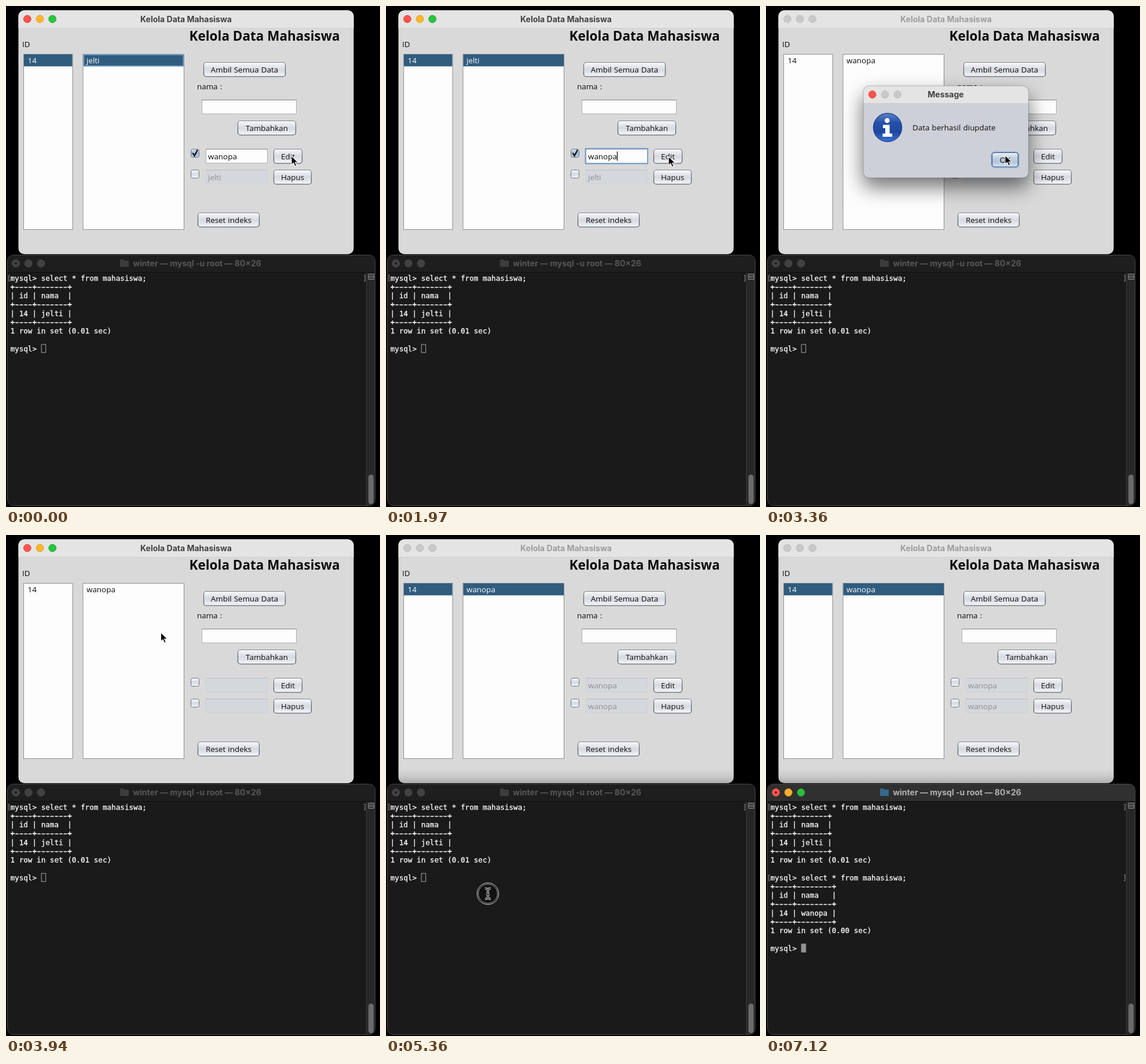
Write an HTML page that moves like this. It is 646 px wide and 866 px high and loops after 7150 ms.

```html
<!DOCTYPE html>
<html lang="id">
<head>
<meta charset="utf-8">
<title>Kelola Data Mahasiswa</title>
<style>
html, body { margin: 0; width: 100%; height: 100%; overflow: hidden; background: #000; }
svg { display: block; width: 646px; height: 866px; }
text { font: 500 13.4px "Open Sans", "Noto Sans", sans-serif; word-spacing: .6px; fill: #0b0b0b; white-space: pre; }
.mid { text-anchor: middle; }
.head { font-size: 22.5px; font-weight: 700; word-spacing: 0; }
.bar { font: 700 14px Inter, Roboto, sans-serif; word-spacing: 0; text-anchor: middle; fill: #9d9c9c; }
.live > .bar { fill: #414040; }
.light { fill: #cac9c9; stroke: #bfbebe; }
.live > .red { fill: #fc554f; stroke: #e2463f; }
.live > .yellow { fill: #fdb62d; stroke: #e0a023; }
.live > .green { fill: #29c53c; stroke: #1fa92f; }
.chrome { fill: #e5e4e4; }
.list { fill: #fdfdfd; stroke: #8b8d92; }
.row { fill: #305c7e; }
.ring { fill: none; stroke: #73a1cd; stroke-width: 2; }
.white { fill: #fff; }
.grey { fill: #8d8e90; }
.btn rect { fill: url(#face); stroke: url(#edge); stroke-width: 1.2; }
.pressed rect { fill: url(#down); stroke: #39587c; }
.default rect { fill: url(#tint); stroke: #2c4468; }
.dlg { filter: drop-shadow(0 16px 17px rgba(0, 0, 0, .55)); }
#term .light { fill: #414142; stroke: #4a4a4b; }
#term .bar { fill: #575758; }
#term .dot { fill: #1d1d1e; }
#term .chrome { fill: #1e1e1f; }
#term .folder { fill: #3c3c3d; }
#term.live .red { fill: #f95951; stroke: #ee504a; }
#term.live .yellow { fill: #f8b02b; stroke: #eda526; }
#term.live .green { fill: #2ac03b; stroke: #25b535; }
#term.live .bar { fill: #b3b3b4; }
#term.live .dot { fill: #7b130f; }
#term.live .chrome { fill: #303031; }
#term.live .folder { fill: #356a8e; }
.mono { font: 12.62px "DejaVu Sans Mono", "Noto Sans Mono", monospace; word-spacing: 0; fill: #fbfbfb; stroke: #fbfbfb; stroke-width: .3; }
.mark { fill: #8c8c8c; stroke: none; }
.dash { stroke: #f0f0f0; stroke-width: 1.1; stroke-dasharray: 6.6 1; }
.block { fill: none; stroke: #929292; stroke-width: 1.2; }
#term.live .block { fill: #929292; }
</style>
</head>
<body>
<svg id="stage" viewBox="0 0 646 866"></svg>
<script>
const LOOP = 7150;
// Key moments in ms
const FOCUS = 700, PRESS = 2220, OPEN = 2330, SAVED = 2510, CLOSE = 3570,
  PICK = 4300, LEAVE = 5290, ENTERED = 5420, RECALL = 6080, RUN = 6700;
const OLD = 'jelti', NEW = 'wanopa';

const rect = (x, y, w, h, rest = '') => `<rect x="${x}" y="${y}" width="${w}" height="${h}" ${rest}/>`;
const text = (x, y, s, cls = '') => `<text x="${x}" y="${y}" class="${cls}">${s.replace('>', '&gt;')}</text>`;
const path = (d, rest) => `<path d="${d}" ${rest}/>`;
const circle = (x, y, r, rest) => `<circle cx="${x}" cy="${y}" r="${r}" ${rest}/>`;
const during = (from, to, inner) => `<g data-on="${from}-${to}">${inner}</g>`;
const grad = (id, ...colors) => `<linearGradient id="${id}" x2="0" y2="1">` +
  colors.map((c, i) => `<stop offset="${i / (colors.length - 1)}" stop-color="${c}"/>`).join('') + '</linearGradient>';

const lights = (x, y) => ['red', 'yellow', 'green']
  .map((c, i) => circle(x + i * 21.7, y, 6.4, `class="light ${c}"`)).join('');

const button = (x, y, w, label, cls = '') =>
  `<g class="btn ${cls}">${rect(x + .5, y + .5, w - 1, 24.5, 'rx="4.5"')}${text(x + w / 2, y + 17.5, label, 'mid')}</g>`;

const field = (x, y, w) => rect(x + .5, y + .5, w - 1, 24, 'fill="#fdfdfd" stroke="#adafb3"') +
  path(`M${x} ${y + .5}h${w}`, 'stroke="#808184"');

const deadField = y => rect(345.5, y + .5, 106, 24, 'fill="#d4d7dc" stroke="#cdd0d6"') +
  path(`M345 ${y + .5}h107`, 'stroke="#b9bcc2"');

const box = (y, fill) => rect(319.5, y + .5, 14, 14, `rx="3" fill="url(#${fill})" stroke="#6c7380"`);

const defs = '<defs>' +
  grad('face', '#fafafc', '#e7e9ed', '#d6dae1', '#e3e6eb', '#f6f7f9') +
  grad('edge', '#7f848e', '#3f4653') +
  grad('down', '#8b94a2', '#9fa7b3', '#a7afbb', '#c2c9d2') +
  grad('tint', '#eef3f8', '#c6d3e0', '#b3c5d6', '#dae7f2') +
  grad('ticked', '#dce8f2', '#9cb9d1', '#b4d0e5') +
  grad('info', '#5f83c9', '#2450ab', '#1f479f', '#3d73d8') +
  grad('shade', '#0000', '#0001', '#0003') + '</defs>';

function lists() {
  const selected = (from, to, name) => during(from, to,
    rect(31, 83.5, 83.5, 20.8, 'class="row"') + rect(133.5, 83.5, 173.5, 20.8, 'class="row"') +
    text(37.5, 99, '14', 'white') + text(139, 99, name, 'white'));
  const ring = rect(134.3, 84.3, 172, 19.3, 'class="ring" style="stroke-width:1.6"');
  return rect(30.5, 83.5, 84.5, 303, 'class="list"') + rect(133, 83.5, 174.5, 303, 'class="list"') +
    selected(0, SAVED, OLD) +
    during(SAVED, PICK, text(37.5, 99, '14') + text(139, 99, NEW)) +
    selected(PICK, LOOP, NEW) +
    during(0, FOCUS, ring) + during(PICK, LEAVE, ring);
}

function editRows() {
  return during(0, SAVED,
      box(247, 'ticked') + path('M322.5 254l3 5 5.5-10.5', 'fill="none" stroke="#111" stroke-width="2.3"') +
      field(345, 247, 107) + text(349, 264.5, NEW)) +
    during(SAVED, LOOP, box(247, 'face') + deadField(247)) +
    box(283, 'face') + deadField(283) +
    during(0, SAVED, text(349, 300.5, OLD, 'grey')) +
    during(PICK, LOOP, text(349, 264.5, NEW, 'grey') + text(349, 300.5, NEW, 'grey')) +
    during(FOCUS, PRESS, rect(344.5, 246.5, 107.5, 26, 'class="ring"') +
      `<g id="caret">${path('M399.5 251.5v16', 'stroke="#000" stroke-width="1.2"')}</g>`);
}

function mainWindow() {
  return `<g data-live="0-${OPEN} ${CLOSE}-${LEAVE}">` +
    rect(21.5, 7.5, 579, 421.5, 'rx="10" fill="#d9d9d9"') +
    path('M21.5 38V17.5a10 10 0 0 1 10-10h559a10 10 0 0 1 10 10V38z', 'class="chrome"') +
    path('M21.5 38.5h579', 'stroke="#cfcece"') +
    lights(36.8, 22.5) + text(311, 27.5, 'Kelola Data Mahasiswa', 'bar') +
    text(316.5, 60, 'Kelola Data Mahasiswa', 'head') + text(28, 71, 'ID') + text(330, 144, 'nama :') +
    lists() + field(338, 162, 164) + editRows() +
    button(341, 97, 142, 'Ambil Semua Data') + button(400, 198, 101, 'Tambahkan') +
    button(462, 247, 50, 'Edit') + button(462, 283, 66, 'Hapus') + button(331, 357, 107, 'Reset indeks') +
    during(PRESS, SAVED, button(462, 247, 50, 'Edit', 'pressed') +
      rect(461.5, 246.5, 51, 26.5, 'rx="5.5" class="ring" style="stroke-width:1.6"')) +
    during(LEAVE, LOOP, path('M21.5 404h579v15a10 10 0 0 1-10 10h-559a10 10 0 0 1-10-10z', 'fill="url(#shade)"')) + '</g>';
}

function terminal() {
  const base = n => 474.5 + n * 15.25;
  const line = (n, s) => text(7.5, base(n), s, 'mono');
  const query = 'mysql> select * from mahasiswa;';
  const brackets = n => text(1.5, base(n), '[', 'mono mark') + text(616, base(n), ']', 'mono mark');
  // Hyphens are lengthened so that a rule reads as one line
  const rule = (n, s) => line(n, s) + path(`M8 ${base(n) - 3.5}h${s.length * 7.6 - 1}`, 'class="dash"');
  const result = (n, name, time) => {
    const edge = '+----+' + '-'.repeat(name.length + 2) + '+';
    return [0, 2, 4].map(i => rule(n + i, edge)).join('') +
      line(n + 1, `| id | ${'nama'.padEnd(name.length)} |`) +
      line(n + 3, `| 14 | ${name} |`) + line(n + 5, `1 row in set (${time} sec)`);
  };
  const block = (col, n) => rect(8 + col * 7.6, 463 + n * 15.25, 7.4, 14, 'class="block"');
  return `<g id="term" data-live="${ENTERED}-${LOOP}">` +
    rect(2.5, 430.5, 635, 433, 'rx="10" fill="#1a1a1b"') +
    path('M3 460V441a10 10 0 0 1 10-10H627a10 10 0 0 1 10 10V460z', 'class="chrome"') +
    path('M3 460.5H637', 'stroke="#0c0c0c"') +
    path('M622 461H637V854a10 10 0 0 1-10 9H622z', 'fill="#272728"') +
    path('M622.5 461V863', 'stroke="#39393a"') +
    rect(626, 810, 9, 51, 'rx="4.5" fill="#6b6b6c"') +
    path('M626 463.5h9.5v9H626zM626 468h9.5', 'fill="#3a3a3b" stroke="#8b8b8c"') +
    rect(2.5, 430.5, 635, 433, 'rx="10" fill="none" stroke="#4a4a4b"') +
    lights(17, 445) + circle(17, 445, 2.1, 'class="dot"') +
    path('M197 439.5q0-1.5 1.5-1.5h4l1.8 2h6.2q1.5 0 1.5 1.5v8q0 1.5-1.5 1.5h-12q-1.5 0-1.5-1.5z', 'class="folder"') +
    text(330, 449.5, 'winter — mysql -u root — 80×26', 'bar') +
    brackets(0) + line(0, query) + result(1, OLD, '0.01') +
    during(0, RECALL, line(8, 'mysql> ') + block(7, 8)) +
    during(RECALL, LOOP, line(8, query)) +
    during(RECALL, RUN, block(31, 8)) +
    during(RUN, LOOP, brackets(8) + result(9, NEW, '0.00') + line(16, 'mysql> ') + block(7, 16)) + '</g>';
}

function dialog() {
  return during(OPEN, CLOSE, `<g class="dlg live">` +
    rect(168, 138, 285.5, 159, 'rx="10" fill="#cdd0d8"') +
    path('M168 168V148a10 10 0 0 1 10-10H443.5a10 10 0 0 1 10 10V168z', 'class="chrome"') +
    path('M168 168.5H453.5', 'stroke="#cbcaca"') +
    rect(168, 138, 285.5, 159, 'rx="10" fill="none" stroke="#000" stroke-opacity=".22"') +
    circle(183.7, 153, 6.4, 'class="light red"') + circle(205.4, 153, 6.4, 'class="light"') +
    circle(227.1, 153, 6.4, 'class="light"') + text(310.5, 158, 'Message', 'bar') +
    during(SAVED, CLOSE,
      circle(210, 210, 24.6, 'fill="url(#info)" stroke="#1b3f8e" stroke-width="1.2"') +
      circle(209.3, 198, 4.2, 'fill="#fff"') +
      path('M202 205.5h11.5v15h4.5v5.5h-16.5v-5.5h4.5v-9.5h-4z', 'fill="#fff"') +
      text(253, 214.5, 'Data berhasil diupdate') +
      button(390, 253, 46, 'OK', 'default') +
      rect(389.5, 252.5, 47, 26.5, 'rx="5.5" class="ring" style="stroke-width:1.4"')) + '</g>');
}

function pointers() {
  const bar = 'M-5-9q5 0 5 3q0-3 5-3M0-6V6M-5 9q5 0 5-3q0 3 5 3M-2.5 1h5';
  const beam = path(bar, 'fill="none" stroke="#f2f2f2" stroke-width="3.4"') +
    path(bar, 'fill="none" stroke="#111" stroke-width="1.3"');
  return '<g id="pointer"><g id="arrow">' +
    path('M0 0V15.5L3.6 12.2L6.1 18L8.8 16.9L6.3 11.2H11.2Z', 'fill="#000" stroke="#fff" stroke-width="1.1"') +
    '</g><g id="beam">' +
    during(LEAVE, ENTERED, circle(0, 0, 18.7, 'fill="#111" stroke="#d5d5d5"') +
      circle(0, 0, 16.5, 'fill="none" stroke="#a5a5a5"')) + beam + '</g></g>';
}

const $ = id => document.getElementById(id);
$('stage').innerHTML = defs + rect(0, 0, 646, 866) + terminal() + mainWindow() + dialog() + pointers();

const track = [[0, 493, 259], [200, 493, 259], [680, 395, 259], [850, 395, 260], [1150, 458, 267],
  [1450, 488, 260], [2230, 488, 260], [2450, 436, 248], [2900, 413, 258], [3600, 413, 258],
  [4240, 148, 95], [4400, 148, 95], [4700, 131, 114], [4850, 131, 114], [LEAVE, 176, 620], [LOOP, 176, 620]];

function pointerAt(t) {
  const i = track.findIndex(k => k[0] > t);
  const [t0, x0, y0] = track[i - 1], [t1, x1, y1] = track[i];
  const u = (t - t0) / (t1 - t0), e = u * u * (3 - 2 * u);
  return [x0 + (x1 - x0) * e, y0 + (y1 - y0) * e];
}

const spans = key => [...document.querySelectorAll(`[data-${key}]`)].map(el =>
  [el, el.dataset[key].split(' ').map(s => s.split('-').map(Number))]);
const shown = spans('on'), windows = spans('live');
const inside = (list, t) => list.some(([a, b]) => t >= a && t < b);
const show = (el, yes) => el.style.display = yes ? '' : 'none';

const start = performance.now();
function draw() {
  const t = (performance.now() - start) % LOOP;
  for (const [el, list] of shown) show(el, inside(list, t));
  for (const [el, list] of windows) el.classList.toggle('live', inside(list, t));
  show($('caret'), (t - FOCUS) % 1000 < 500);
  const [x, y] = pointerAt(t);
  $('pointer').setAttribute('transform', `translate(${x} ${y})`);
  show($('arrow'), y < 430);
  show($('beam'), y >= 430 && t < RECALL);
  requestAnimationFrame(draw);
}
draw();
</script>
</body>
</html>
```
